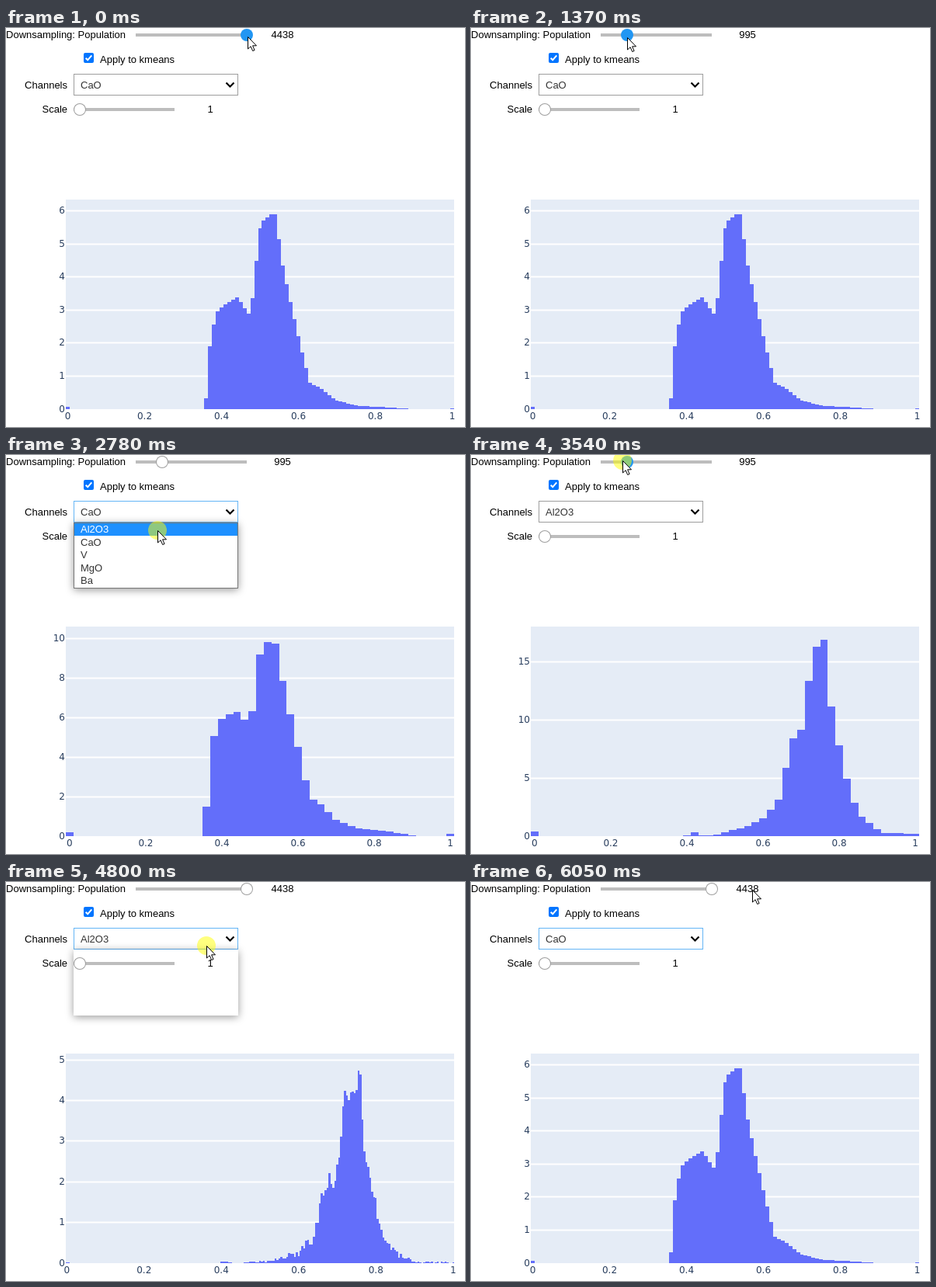
These frames come from a looping animation (591 px wide and 514 px high, 6.12 s). An HTML page with a canvas:

```html
<!DOCTYPE html>
<html lang="en">
<head>
<meta charset="utf-8">
<title>Histogram controls</title>
<style>
html, body { margin: 0; width: 100%; height: 100%; overflow: hidden; background: #fff; }
canvas { display: block; }
</style>
</head>
<body>
<canvas id="stage" width="591" height="514"></canvas>
<script>
const ctx = document.getElementById('stage').getContext('2d');
const LOOP = 6120;
const UI_FONT = '13px "Liberation Sans", Arial, sans-serif';
const AXIS_FONT = '12px "DejaVu Sans", Verdana, sans-serif';
const PLOT = { left: 77, top: 221, width: 500, base: 490.5 };
const CHANNELS = ['Al2O3', 'CaO', 'V', 'MgO', 'Ba'];

// Density curves through key points: position, percent per 0.01
const CAO = [[0, .08], [.005, 0], [.355, 0], [.36, .1], [.37, 2.1], [.39, 3], [.44, 3.4],
  [.475, 2.8], [.5, 5.6], [.54, 6], [.56, 4.3], [.6, 2.2], [.63, .75], [.65, .7],
  [.7, .25], [.76, .1], [.84, .05], [.88, .02], [.9, 0], [.99, 0], [1, .03]];
const ALUMINA = [[0, .08], [.005, 0], [.395, 0], [.41, .1], [.43, 0], [.47, .02], [.55, .2],
  [.6, .5], [.64, 1.25], [.66, 3.2], [.675, 4], [.7, 4.3], [.72, 8.4], [.76, 9.2],
  [.77, 5], [.8, 2.9], [.82, 1.3], [.85, .5], [.9, .06], [1, .03]];

// Downsampling flattens the density: power < 1
const CHARTS = {
  caoFull: { curve: CAO, bin: .01, tick: 1, unit: 42.6, gain: 1, power: 1, shift: 0, noise: 0 },
  caoSample: { curve: CAO, bin: .02, tick: 2, unit: 25.5, gain: 2.4, power: .8, shift: 0, noise: 0 },
  alSample: { curve: ALUMINA, bin: .02, tick: 5, unit: 14.97, gain: 2.9, power: .8, shift: .008, noise: 0 },
  alFull: { curve: ALUMINA, bin: .005, tick: 1, unit: 52.4, gain: .5, power: 1, shift: 0, noise: .17 }
};

// Pointer moves: start, time of last step, number of steps, x, y
const MOVES = [
  [300, 910, 9, 213, 11], [990, 1370, 6, 201, 12], [1530, 1770, 4, 195, 71],
  [2230, 2550, 5, 195, 92], [2620, 2620, 1, 195, 97], [2930, 3400, 7, 195, 7],
  [3710, 4090, 6, 334, 19], [4250, 4630, 6, 258, 82], [5020, 5410, 6, 239, 108],
  [5640, 6050, 6, 362, 10]
];
const PRESSES = [[300, 1370], [2000, 2150], [2780, 2930], [3540, 4250], [4800, 4950], [5490, 5640]];
const MENUS = [[2000, 2930], [4800, 5640]];

const within = (t, [from, to]) => t >= from && t < to;
const smooth = p => p * p * (3 - 2 * p);
const noiseAt = i => (Math.sin(i * 127.1 + 3) * 43758.5 % 1 + 1) % 1 * 2 - 1;

function pointerAt(t) {
  let x = 311, y = 11;
  for (const [start, end, steps, toX, toY] of MOVES) {
    if (t < start) break;
    const done = t >= end ? steps : 1 + Math.floor((t - start) / (end - start) * (steps - 1));
    const p = smooth(done / steps);
    x += (toX - x) * p;
    y += (toY - y) * p;
  }
  return { x, y };
}

function knobAt(t, pointer) {
  if (t < 300 || t >= 4250) return 310;
  if (t < 1530) return Math.min(310, pointer.x);
  if (t < 3710) return 201;
  return Math.min(310, pointer.x + 6);
}

function chartAt(t) {
  if (t < 1530 || t >= 5640) return CHARTS.caoFull;
  if (t < 2930) return CHARTS.caoSample;
  return t < 4250 ? CHARTS.alSample : CHARTS.alFull;
}

function density(curve, x) {
  const next = curve.findIndex(([knot]) => knot > x);
  if (next < 1) return (next ? curve[curve.length - 1] : curve[0])[1];
  const [x0, y0] = curve[next - 1], [x1, y1] = curve[next];
  return y0 + (y1 - y0) * (x - x0) / (x1 - x0);
}

function barHeight({ curve, bin, gain, power, shift, noise }, i) {
  const x = i * bin - shift;
  const mean = (density(curve, x - bin / 4) + density(curve, x + bin / 4)) / 2;
  const h = gain * mean ** power;
  return Math.max(0, h + noise * Math.sqrt(h) * noiseAt(i));
}

function rect(x, y, w, h, color) {
  ctx.fillStyle = color;
  ctx.fillRect(x, y, w, h);
}

function text(str, x, y, align = 'left', color = '#000', font = UI_FONT) {
  ctx.font = font;
  ctx.textAlign = align;
  ctx.fillStyle = color;
  ctx.fillText(str, x, y);
}

function line(points, color, width) {
  ctx.beginPath();
  points.forEach(([x, y]) => ctx.lineTo(x, y));
  ctx.strokeStyle = color;
  ctx.lineWidth = width;
  ctx.stroke();
}

function frame(x, y, w, h, color) {
  ctx.strokeStyle = color;
  ctx.lineWidth = 1;
  ctx.strokeRect(x + .5, y + .5, w - 1, h - 1);
}

function disc(x, y, r, color) {
  ctx.beginPath();
  ctx.arc(x, y, r, 0, Math.PI * 2);
  ctx.fillStyle = color;
  ctx.fill();
}

function slider(left, right, y, knob, hot) {
  rect(left, y - 2, right - left, 4, '#bdbdbd');
  disc(knob, y, 8, hot ? '#2196f3' : '#9e9e9e');
  if (!hot) disc(knob, y, 7, '#fff');
}

function checkbox(x, y) {
  ctx.beginPath();
  ctx.roundRect(x, y, 13, 13, 2);
  ctx.fillStyle = '#0075ff';
  ctx.fill();
  line([[x + 2.7, y + 6.7], [x + 5.2, y + 9.3], [x + 10.3, y + 3.3]], '#fff', 2);
}

function scaleControl() {
  text('Scale', 79, 109, 'right');
  slider(87, 217, 105, 95, false);
  text('1', 263, 109, 'center');
}

function menuPanel() {
  ctx.save();
  ctx.shadowColor = 'rgba(0,0,0,.4)';
  ctx.shadowBlur = 10;
  ctx.shadowOffsetY = 2;
  rect(87, 87, 212, 85, '#fff');
  ctx.restore();
}

function menuItems(channel, pointer) {
  const row = 16.6;
  const active = pointer.y >= 88 ? Math.floor((pointer.y - 88) / row) : CHANNELS.indexOf(channel);
  CHANNELS.forEach((name, i) => {
    if (i === active) rect(88, Math.round(88 + i * row), 210, 16, '#1e90ff');
    text(name, 96, Math.round(100 + i * 16.5), 'left', i === active ? '#fff' : '#333');
  });
  frame(87, 87, 212, 85, '#767676');
}

function chart(spec) {
  const { bin, tick, unit } = spec;
  const { left, top, width, base } = PLOT;
  const barWidth = width * bin / (1 + bin);
  const ink = '#2a3f5f';
  rect(left, top, width, 270, '#e5ecf6');
  for (let v = 0; base - v * unit > top; v += tick) {
    const y = Math.round(base - v * unit);
    if (v) rect(left, y - .5, width, 2, '#fff');
    text(v, 76, y + 4, 'right', ink, AXIS_FONT);
  }
  for (let i = 0; i <= Math.round(1 / bin); i++) {
    const x = Math.round(left + i * barWidth);
    const next = Math.round(left + (i + 1) * barWidth);
    const h = Math.round(barHeight(spec, i) * unit);
    if (h) rect(x, 491 - h, next - x, h, '#636efa');
  }
  for (let i = 0; i <= 5; i++) {
    text(i / 5, left + barWidth / 2 + i / 5 * (width - barWidth), 504, 'center', ink, AXIS_FONT);
  }
}

function arrow({ x, y }) {
  ctx.save();
  ctx.translate(Math.round(x) + .5, Math.round(y) + .5);
  ctx.beginPath();
  [[0, 0], [0, 15.5], [3.6, 12.2], [6.2, 18], [8.6, 17], [6.1, 11.3], [11, 11.3]]
    .forEach(([px, py]) => ctx.lineTo(px, py));
  ctx.closePath();
  ctx.fillStyle = '#fff';
  ctx.fill();
  ctx.strokeStyle = '#000';
  ctx.lineWidth = 1;
  ctx.stroke();
  ctx.restore();
}

function draw(t) {
  const pointer = pointerAt(t);
  const knob = knobAt(t, pointer);
  const channel = within(t, [2930, 5640]) ? 'Al2O3' : 'CaO';
  const hot = t < 2000 || within(t, [3400, 4800]);
  const focused = within(t, [2000, 3540]) || t >= 4800;
  const menu = MENUS.find(span => within(t, span));
  const filled = menu && t >= menu[0] + 60;

  rect(0, 0, 591, 514, '#fff');
  chart(chartAt(t));

  text('Downsampling: Population', 154, 13, 'right');
  slider(167, 310, 9, knob, hot);
  text(Math.round(4438 - (310 - knob) * 3443 / 109), 356, 13, 'center');
  checkbox(100, 32);
  text('Apply to kmeans', 121, 45);

  text('Channels', 79, 78, 'right');
  frame(87, 59, 212, 28, focused ? '#64b5f6' : '#9e9e9e');
  text(channel, 96, 78, 'left', '#333');
  line([[283.5, 70.5], [288.5, 75.5], [293.5, 70.5]], '#000', 2.2);

  // The list opens blank, with the controls below still showing through.
  if (filled) scaleControl();
  if (menu) menuPanel();
  if (filled) menuItems(channel, pointer);
  else scaleControl();

  if (PRESSES.some(span => within(t, span))) {
    disc(pointer.x, pointer.y, 12, 'rgba(255,255,0,.5)');
  }
  arrow(pointer);
}

function tick() {
  draw(performance.now() % LOOP);
  requestAnimationFrame(tick);
}
tick();
</script>
</body>
</html>
```
